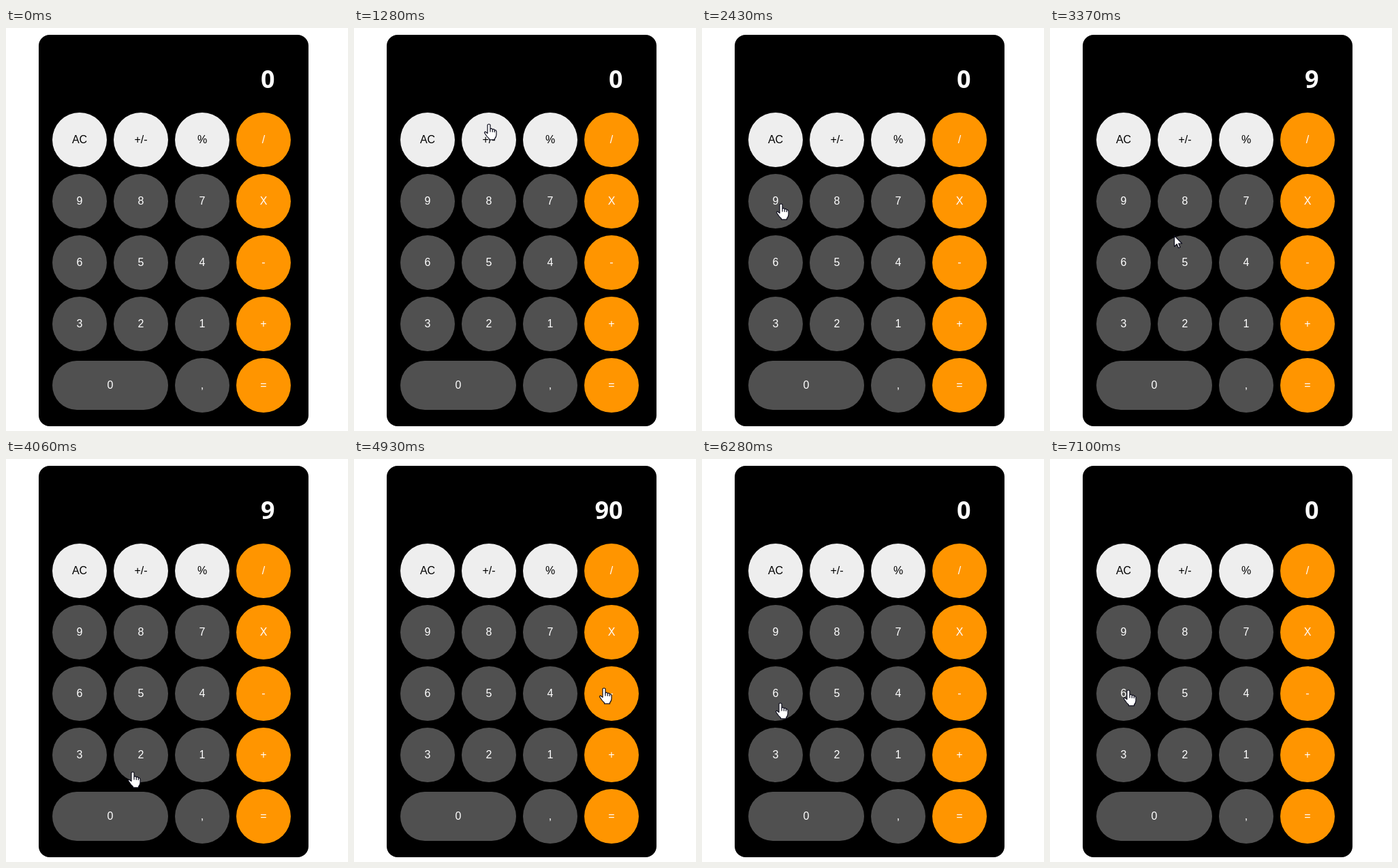
An HTML page that plays this animation: 502 by 591 pixels, repeating every 8000 ms.

```html
<!DOCTYPE html>
<html lang="en">
<head>
<meta charset="utf-8">
<title>Calculator</title>
<style>
  html, body { margin: 0; width: 100%; height: 100%; overflow: hidden; background: #fff; }
  svg { display: block; }
  .key { font: 16px "Liberation Sans", Arial, sans-serif; text-anchor: middle; }
  #display { font: 700 36px "Open Sans", "Noto Sans", sans-serif; text-anchor: end; fill: #fff; }
  #cursor path { fill: #fff; stroke: #0c0c1c; stroke-width: 1.2; stroke-linejoin: round; }
</style>
</head>
<body>
<svg width="502" height="591" viewBox="0 0 502 591">
  <rect x="48" y="10" width="396" height="574" rx="16"/>
  <text id="display" x="394.5" y="87.5">0</text>
  <g id="keys"></g>
  <g id="cursor">
    <path id="arrow" d="M.5.5V16.5L4.2 13 6.6 18.5 9 17.5 6.7 12H11.7Z"/>
    <g id="hand" transform="translate(-2 .5)">
      <path d="M-2 1.7Q0-.7 2 1.7V7.5Q4 6 5.3 8.2Q7.3 7 8.3 9.2Q10.3 8.8 11 11V16Q11 19 8.5 22V23.4H.5V22Q-3 19-6.5 13.2Q-6 10.5-4 12.5L-2 14Z"/>
      <path d="M2 7.5V12M5.3 8.5V12.3M8.3 9.5V12.6"/>
    </g>
  </g>
</svg>
<script>
const $ = id => document.getElementById(id);
const LOOP = 8000, FPS = 15;

const keys = [];
['AC,+/-,%,/', '9,8,7,X', '6,5,4,-', '3,2,1,+'].forEach((row, r) =>
  row.split(',').forEach((label, c) => addKey(label, 108 + c * 90, 164 + r * 90)));
addKey('0', 153, 524, 85, 36);
addKey(',', 288, 524);
addKey('=', 378, 524);

// Centre and half size of a key.
function addKey(label, x, y, w = 40, h = 40) {
  const light = y < 200 && x < 340;
  const fill = light ? '#eee' : x > 340 ? '#ff9500' : '#505050';
  keys.push({ x, y, w, h });
  $('keys').innerHTML +=
    `<rect x="${x - w}" y="${y - h}" width="${w * 2}" height="${h * 2}" rx="${h}" fill="${fill}"/>` +
    `<text class="key" x="${x}" y="${y + 5}" fill="${light ? '#000' : '#fff'}">${label}</text>`;
}

// Pointer stops: arrival tick, x, y, ticks waited before setting off.
const stops = [
  [2, 490, 535], [4, 421, 250], [14, 371, 157, 4], [16, 452, 103, 1],
  [19, 200, 140], [24, 116, 250], [27, 138, 274], [36, 118, 257],
  [54, 246, 350, 10], [61, 188, 458], [63, 175, 502], [72, 346, 388, 3],
  [74, 369, 335], [81, 377, 263], [94, 117, 357, 1], [98, 161, 364], [106, 117, 338]
];
const presses = { 0: '0', 44: '9', 66: '90', 83: '0' };

function pointAt(tick) {
  const i = stops.findIndex(s => s[0] >= tick);
  if (i < 1) return stops.at(i).slice(1, 3);
  const [t0, x0, y0] = stops[i - 1];
  const [t1, x1, y1, wait = 0] = stops[i];
  const k = Math.max(0, (tick - t0 - wait) / (t1 - t0 - wait));
  return [Math.round(x0 + (x1 - x0) * k), Math.round(y0 + (y1 - y0) * k)];
}

// Keys are pills: measure from the nearest point of the centre line.
const isOver = (x, y) => keys.some(k =>
  Math.hypot(Math.max(0, Math.abs(x - k.x) - k.w + k.h), y - k.y) < k.h);

const show = (id, on) => $(id).style.display = on ? '' : 'none';

function draw(ms) {
  const tick = Math.floor(ms * FPS / 1000 + .3);
  const [x, y] = pointAt(tick);
  const over = isOver(x, y);
  $('display').textContent = presses[Object.keys(presses).findLast(t => t <= tick)];
  $('cursor').setAttribute('transform', `translate(${x} ${y})`);
  show('cursor', tick >= stops[0][0]);
  show('hand', over);
  show('arrow', !over);
}

const begin = performance.now();
function run() {
  draw((performance.now() - begin) % LOOP);
  requestAnimationFrame(run);
}
run();
</script>
</body>
</html>
```
